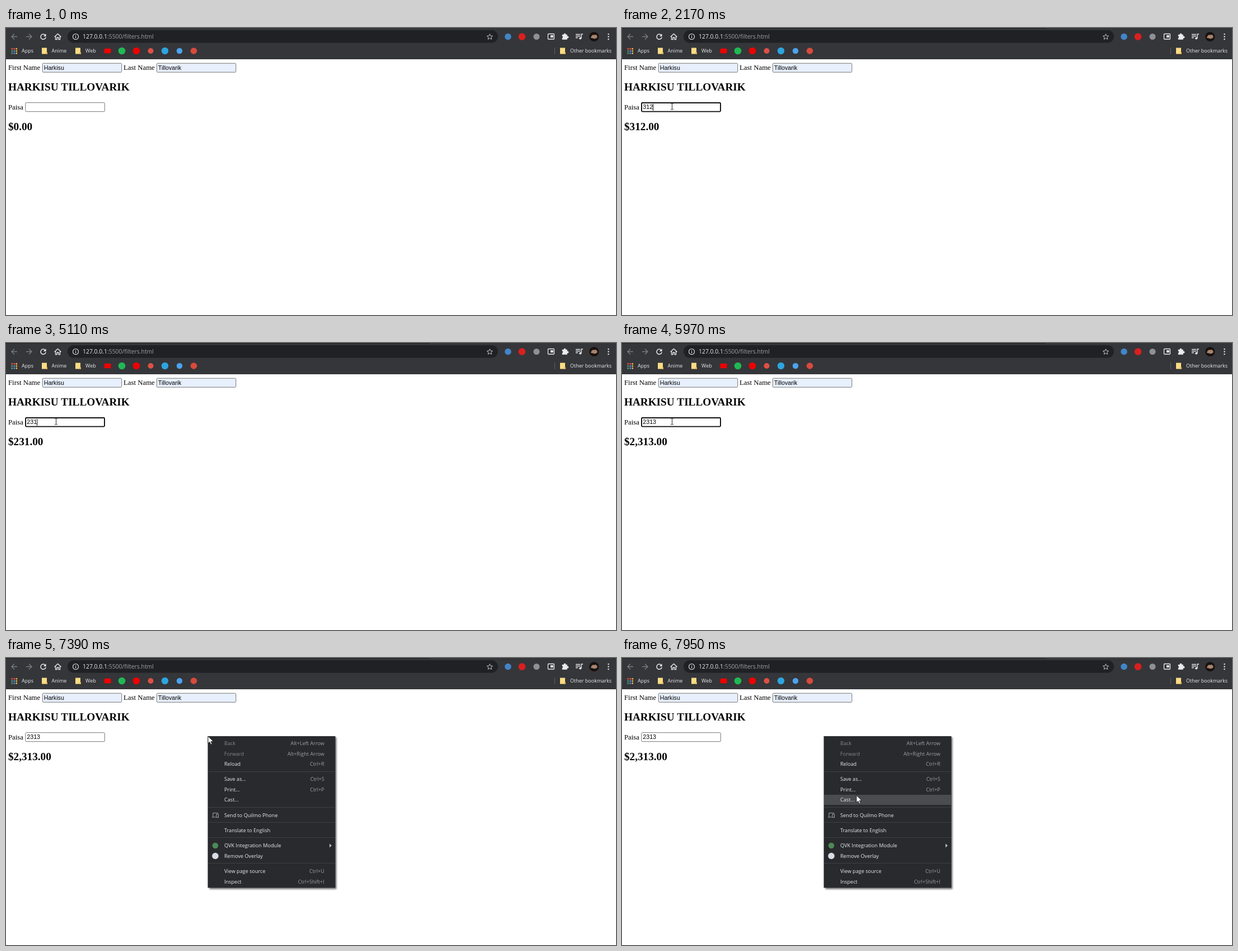
An HTML page with a canvas that plays this animation: 1090x514 px, repeating every 8000 ms.

```html
<!DOCTYPE html>
<html lang="en">
<head>
<meta charset="utf-8">
<title>Filters</title>
<style>
html, body { margin: 0; width: 100%; height: 100%; overflow: hidden; background: #fff; }
canvas { display: block; }
</style>
</head>
<body>
<canvas id="stage" width="1090" height="514"></canvas>
<script>
const ctx = document.getElementById("stage").getContext("2d");
const LOOP = 8000;
const UI = '"Open Sans", "Noto Sans", sans-serif';
const SERIF = '"Liberation Serif", serif';
const SANS = '"Liberation Sans", sans-serif';
const FIRST = "Harkisu", LAST = "Tillovarik";
const BAR = "#35363a", DARK = "#202124", PANEL = "#292a2d", LINE = "#3f4043";
const LIGHT = "#e8eaed", GREY = "#9aa0a6";

// time, field text, caret visible
const TYPING = [
  [760, "", true], [1530, "3", true], [1960, "31", true], [2170, "312", true],
  [2730, "312", false], [3060, "31", true], [3160, "3", true], [3270, "", true],
  [3700, "", false], [4250, "2", true], [4560, "23", true], [5110, "231", true],
  [5420, "2313", true], [5970, "2313", false], [6400, "2313", true],
  [6950, "2313", false]
];
// time, pointer x, pointer y
const POINTER = [
  [100, 965, 484], [210, 690, 372], [320, 440, 268], [430, 245, 196],
  [540, 130, 156], [650, 90, 141], [2070, 89, 141], [6310, 94, 142],
  [6400, 99, 144], [6950, 140, 138], [7060, 236, 130], [7170, 322, 133],
  [7280, 361, 140], [7610, 370, 158], [7720, 388, 192], [7840, 410, 230],
  [7950, 419, 246]
];
const MENU = [
  [153, "Back", "Alt+Left Arrow", true], [171.5, "Forward", "Alt+Right Arrow", true],
  [190, "Reload", "Ctrl+R"], [217, "Save as...", "Ctrl+S"],
  [236, "Print...", "Ctrl+P"], [254, "Cast..."], [281.5, "Send to Quilmo Phone"],
  [309, "Translate to English"], [336, "QVK Integration Module"],
  [354.5, "Remove Overlay"], [382, "View page source", "Ctrl+U"],
  [400.5, "Inspect", "Ctrl+Shift+I"]
];
const BLUR = 7280, MENU_OPEN = 7390;

const latest = (rows, t) => rows.filter(row => row[0] <= t).pop();

function text(str, x, y, font, color, align = "left") {
  ctx.font = font;
  ctx.fillStyle = color;
  ctx.textAlign = align;
  ctx.fillText(str, x, y);
}

function rect(x, y, w, h, color) {
  ctx.fillStyle = color;
  ctx.fillRect(x, y, w, h);
}

function round(x, y, w, h, r, fill, stroke, width = 1) {
  ctx.beginPath();
  ctx.roundRect(x, y, w, h, r);
  if (fill) { ctx.fillStyle = fill; ctx.fill(); }
  if (stroke) { ctx.strokeStyle = stroke; ctx.lineWidth = width; ctx.stroke(); }
}

function dot(x, y, r, color) {
  ctx.beginPath();
  ctx.arc(x, y, r, 0, 2 * Math.PI);
  ctx.fillStyle = color;
  ctx.fill();
}

function path(d, x, y, stroke, fill, width = 1.3) {
  const shape = new Path2D(d);
  ctx.save();
  ctx.translate(x, y);
  if (fill) { ctx.fillStyle = fill; ctx.fill(shape); }
  if (stroke) { ctx.strokeStyle = stroke; ctx.lineWidth = width; ctx.stroke(shape); }
  ctx.restore();
}

function withShadow(blur, dx, dy, draw) {
  ctx.save();
  ctx.shadowColor = "rgba(0,0,0,.55)";
  ctx.shadowBlur = blur;
  ctx.shadowOffsetX = dx;
  ctx.shadowOffsetY = dy;
  draw();
  ctx.restore();
}

function folder(x, label, labelX) {
  path("M0 0H9V7.5L10 8.5V11H0Z", x, 35.5, null, "#fbdc83");
  path("M7.5 7V11H10V8.5Z", x, 35.5, null, "#e6b94e");
  text(label, labelX, 44.3, "9px " + UI, LIGHT);
}

function toolbar(t) {
  rect(0, 0, 1090, 56, BAR);
  if (t >= 970) rect(0, 0, 757, 1, DARK);

  const arrow = "M5 0H-5M0 -5L-5 0L0 5";
  path(arrow, 15, 15.5, "#7c7d81");
  path("M-5 0H5M0 -5L5 0L0 5", 41, 15.5, "#7c7d81");
  path("M3.4 -3A4.6 4.6 0 1 0 4.6 1", 66.5, 15.5, LIGHT, null, 1.5);
  path("M5 -5.2V-.6H.4Z", 66.5, 15.5, null, LIGHT);
  path("M-6 .5L0 -5L6 .5M-4 -.5V5H-1.4V1.5H1.4V5H4V-.5", 92.5, 15.5, LIGHT);

  round(110, 4, 769, 22.5, 11.25, DARK);
  path("M5 0A5 5 0 1 1 -5 0A5 5 0 1 1 5 0M0 -.7V2.8M0 -2.8V-1.6", 124.5, 15.5, LIGHT, null, 1.1);
  const urlFont = "10.4px " + UI;
  text("127.0.0.1", 137, 19.2, urlFont, LIGHT);
  text(":5500/filters.html", 137 + ctx.measureText("127.0.0.1").width, 19.2, urlFont, GREY);
  path("M0 -5L1.5 -1.7L5.1 -1.4L2.4 1L3.2 4.5L0 2.6L-3.2 4.5L-2.4 1L-5.1 -1.4L-1.5 -1.7Z",
    864.5, 15.7, "#c4c7cb", null, 1);

  dot(897, 15.5, 5.8, "#4285c8");
  dot(922, 15.5, 6.3, "#d9201f");
  dot(948, 15.5, 5.5, "#8d9196");
  round(968.5, 10.5, 11, 9.5, 1, null, LIGHT, 1.3);
  rect(973, 13, 5, 4, LIGHT);
  path("M-5 -3H-2A1.8 1.8 0 1 1 1.4 -3H4V0A1.8 1.8 0 1 1 4 3.2V6H-5V3A1.7 1.7 0 0 0 -5 -.3Z",
    998.8, 14.8, null, LIGHT);
  path("M-6 -4H2M-6 -1H2M-6 2H-2M4 3V-4.5H7", 1024, 15.5, LIGHT, null, 1.4);
  dot(1022.8 + 3.4, 18.5, 2, LIGHT);
  dot(1050.8, 15.5, 8.6, "#17110f");
  path("M-6 2Q-4 -4 0 -3Q5 -5 6 1Q3 5 -2 3Z", 1050.8, 15.5, null, "#a7836c");
  for (const y of [11, 15.5, 20]) dot(1076.5, y, 1.2, LIGHT);

  const appColors = ["#e8503f", "#e8503f", "#f0b43c", "#4ba568", "#4b8bf0", "#f0b43c", "#4ba568", "#4b8bf0", "#f0b43c"];
  appColors.forEach((color, i) => rect(9.5 + i % 3 * 4, 36 + Math.floor(i / 3) * 4, 2.6, 2.6, color));
  text("Apps", 28, 44.3, "9px " + UI, LIGHT);
  folder(64, "Anime", 81.5);
  folder(124, "Web", 142);
  round(175.5, 36.7, 12, 8.6, 2, "#f00000");
  dot(207, 41, 6.3, "#20b954");
  dot(233, 41, 6.2, "#f00000");
  dot(258.5, 41, 5, "#df5045");
  dot(284, 41, 6.2, "#2ca5df");
  dot(310, 41, 5.2, "#4aa3ee");
  dot(335.5, 41, 5.8, "#d84a3c");
  rect(980, 35, 1, 12, "#5c5e62");
  folder(990, "Other bookmarks", 1008);
}

function field(x, y, value, fill) {
  round(x + .5, y + .5, 141.5, 16, 1.5, fill, "#767676");
  text(value, x + 3, y + 12.1, "10.67px " + SANS, "#000");
}

function page(t) {
  const [, value, caret] = latest(TYPING, t) || [0, "", false];
  const focused = t >= 760 && t < BLUR;
  const label = "12.8px " + SERIF, heading = "bold 19.2px " + SERIF;

  text("First Name", 4, 75, label, "#000");
  field(64.7, 62.7, FIRST, "#e8f0fe");
  text("Last Name", 210, 75, label, "#000");
  field(268.8, 62.7, LAST, "#e8f0fe");
  text(`${FIRST} ${LAST}`.toUpperCase(), 4, 112.3, heading, "#000");

  text("Paisa", 4, 145.7, label, "#000");
  field(34.3, 133.2, value, "#fff");
  if (focused) {
    round(35, 134, 141, 15.6, 1.5, null, "#101010", 1.9);
    if (caret) {
      ctx.font = "10.67px " + SANS;
      rect(Math.round(37.6 + ctx.measureText(value).width), 136, 1, 12, "#000");
    }
  }
  const money = "$" + Number(value).toLocaleString("en-US", { minimumFractionDigits: 2 });
  text(money, 4, 183, heading, "#000");
}

function suggestions() {
  withShadow(4, 0, 1, () => round(34, 151, 154, 92, 2, PANEL));
  text("India", 43.3, 175.6, "bold 9.5px " + UI, LIGHT);
  text(`${FIRST} ${LAST}`, 43.3, 192.4, "9.05px " + UI, LIGHT);
  rect(34, 210, 154, 1, LINE);
  text("Manage addresses...", 43.3, 231.2, "9.75px " + UI, LIGHT);
}

function contextMenu(pointerY) {
  withShadow(3, 2, 2, () => rect(360.5, 140, 228, 271.5, PANEL));
  for (const y of [203, 267, 294, 321, 367]) rect(361, y, 227, 1, LINE);
  const font = "9.1px " + UI;
  for (const [y, name, keys, disabled] of MENU) {
    if (!disabled && Math.abs(pointerY - y) < 9.2) rect(361, y - 9, 227, 18, "#4b4c4f");
    text(name, 390, y + 3.3, font, disabled ? "#858689" : LIGHT);
    if (keys) text(keys, 568.8, y + 3.3, font, GREY, "right");
  }
  path("M-4 3V-4H5M-6 3.5H1M2 -2H5.5V4H2Z", 374, 281.5, GREY, null, 1.1);
  dot(374, 336, 5.3, "#4c8a55");
  dot(374, 354.5, 5.8, "#d8dce4");
  path("M0 -3.5L4 0L0 3.5Z", 578, 336, null, "#b4b7bb");
}

function pointer(x, y) {
  const overField = x > 34 && x < 177 && y > 133 && y < 151;
  if (overField) {
    path("M-2.5 -5.5H-.7L0 -5L.7 -5.5H2.5M0 -5V5M-2.5 5.5H-.7L0 5L.7 5.5H2.5", x + .5, y - .5, "#222", null, 1);
  } else {
    path("M0 0V13L3 10.2L5 15L7.2 14L5.2 9.4H9.4Z", x, y, "#222", "#fff", .9);
  }
}

function draw() {
  const t = performance.now() % LOOP;
  const spot = latest(POINTER, t);
  rect(0, 0, 1090, 514, "#fff");
  page(t);
  toolbar(t);
  if (t >= 970 && t < 1530) suggestions();
  if (t >= MENU_OPEN) contextMenu(spot[2]);
  if (spot) pointer(spot[1], spot[2]);
  requestAnimationFrame(draw);
}
draw();
</script>
</body>
</html>
```
